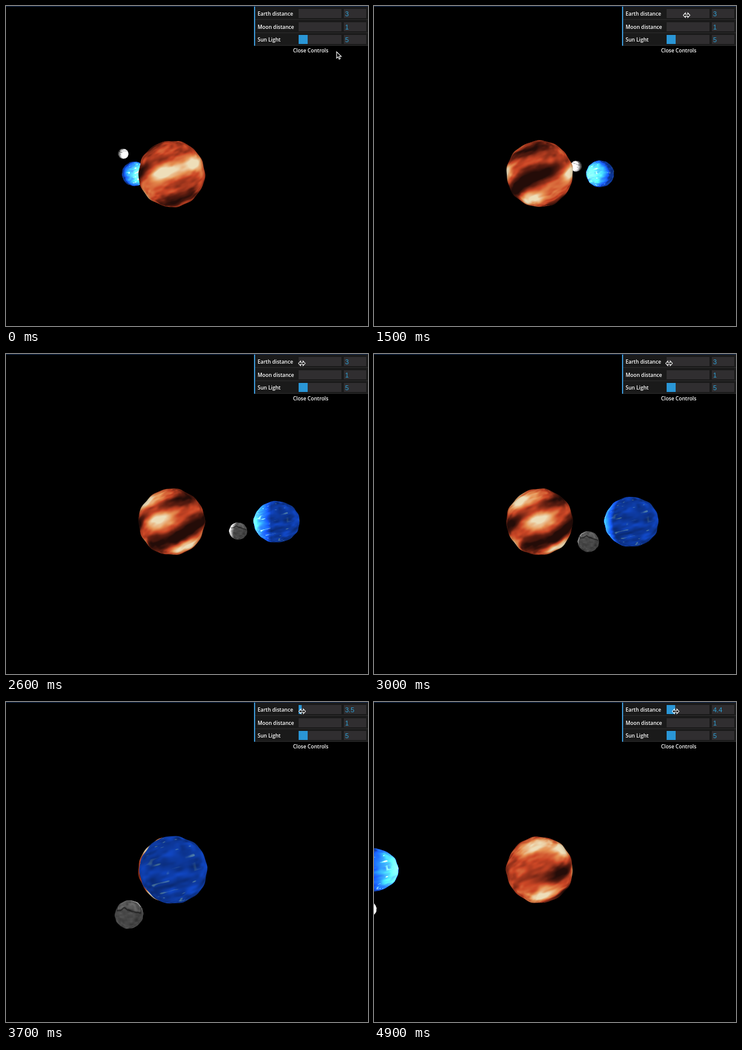
Animation of 600x531 px, one loop 5 s. Source, as an HTML page with a canvas:

```html
<!DOCTYPE html>
<html lang="en">
<head>
<meta charset="utf-8">
<title>Sun, Earth and Moon</title>
<style>
html, body { margin: 0; width: 100%; height: 100%; overflow: hidden; background: #000; }
canvas { display: block; width: 600px; height: 531px; }
</style>
</head>
<body>
<canvas id="stage" width="600" height="531"></canvas>
<script>
const W = 600, H = 531, LOOP = 5000, STEP = 100;
const CX = 274.5, CY = 278.5, FOCAL = 364, CAM = 7;
const ctx = document.getElementById('stage').getContext('2d');
const image = ctx.createImageData(W, H);
const px = image.data;

const clamp = (v, a = 0, b = 1) => Math.min(b, Math.max(a, v));
const mix = (a, b, k) => a + (b - a) * k;
const smooth = (a, b, v) => { const k = clamp((v - a) / (b - a)); return k * k * (3 - 2 * k); };

// Linear interpolation over rows of [position, value, ...]
function track(keys, t, col = 1) {
  let i = 1;
  while (i < keys.length - 1 && t > keys[i][0]) i++;
  const a = keys[i - 1], b = keys[i];
  return mix(a[col], b[col], clamp((t - a[0]) / (b[0] - a[0])));
}

function hash(x, y) {
  let h = Math.imul(x, 374761393) + Math.imul(y, 668265263) | 0;
  h = Math.imul(h ^ (h >>> 13), 1274126177);
  return ((h ^ (h >>> 16)) >>> 0) / 4294967296;
}

function noise(x, y) {
  const i = Math.floor(x), j = Math.floor(y);
  const u = smooth(0, 1, x - i), v = smooth(0, 1, y - j);
  return mix(mix(hash(i, j), hash(i + 1, j), u), mix(hash(i, j + 1), hash(i + 1, j + 1), u), v);
}

const fbm = (x, y) => 0.65 * noise(x, y) + 0.35 * noise(x * 2.1 + 7, y * 2.1 + 3);

// Slanted soft spots on a sphere, given as [longitude, latitude]
function glow(spots, lon, lat, width, height) {
  let sum = 0;
  for (const [a, b] of spots) {
    const dx = lon - a, u = dx * Math.cos(b) / width;
    const v = (lat - b + 0.28 * dx) * Math.cos(b) / height;
    sum += Math.exp(-u * u - v * v);
  }
  return sum;
}

const flares = [[-0.2, -0.04], [0.7, -0.3], [-1.65, 0.78], [-2.55, -0.05], [-3.2, -0.65], [-4.2, -0.78], [-4.05, 0.8]];
const shades = [[0.14, 0.84], [-1.37, 0], [-1.87, 0.36], [-1.57, -0.74], [-3.57, 0.09], [-2.83, 0.72]];
const heat = [[0, 36, 12, 8], [0.25, 95, 29, 16], [0.5, 203, 70, 37], [0.72, 230, 145, 82], [0.95, 238, 222, 185]];

function sunColor(lon, lat, facing) {
  const n = fbm(lon * 3 + 20, lat * 6 + lon * 2 + 9) - 0.5;
  const h = 0.48 + 0.36 * n + 0.55 * glow(flares, lon, lat, 0.43, 0.21) - 0.5 * glow(shades, lon, lat, 0.6, 0.19);
  const k = 0.82 + 0.18 * smooth(0, 0.5, facing);
  return [1, 2, 3].map(c => track(heat, h, c) * k);
}

function earthColor(lon, lat, facing, lit) {
  const n = fbm(lon * 2.5 + 40, lat * 5 + lon + 5);
  const cloud = 0.7 * smooth(0.8, 0.97, noise(lon * 4 + 11, lat * 10 + lon * 2.5));
  const k = (0.65 + 0.7 * n) * (1 + 4.3 * lit);
  return [mix(13, 95, cloud) * k + 70 * lit * lit, mix(56, 140, cloud) * k, mix(155, 160, cloud) * k];
}

function moonColor(lon, lat, facing, lit) {
  const n = fbm(lon * 2.5 + 60, lat * 4 + 31);
  const ridge = lat + 0.42 + 0.6 * (noise(lon * 3 + 5, 2) - 0.5);
  const crack = 1 - smooth(0, 0.1, Math.abs(ridge));
  const g = (42 + 50 * n + 22 * smooth(0, -0.2, ridge)) * (1 - 0.5 * crack) * (1 + 4.3 * lit);
  return [g, g, g];
}

function drawBody({ x, y, z, r, spin, color, seed }) {
  const cz = z - CAM, scale = -FOCAL / cz;
  const sx = CX + x * scale, sy = CY + y * scale, ext = r * scale * 1.5 + 4;
  const x1 = Math.min(W, Math.ceil(sx + ext)), y1 = Math.min(H, Math.ceil(sy + ext));
  for (let j = Math.max(0, Math.floor(sy - ext)); j < y1; j++) {
    for (let i = Math.max(0, Math.floor(sx - ext)); i < x1; i++) {
      // Point of the viewing ray closest to the centre
      const dx = (i + 0.5 - CX) / FOCAL, dy = (j + 0.5 - CY) / FOCAL;
      const len2 = dx * dx + dy * dy + 1;
      const near = (dx * x + dy * y - cz) / len2;
      const qx = near * dx - x, qy = near * dy - y, qz = -near - cz;
      const b = Math.hypot(qx, qy, qz);
      if (b > r * 1.06) continue;
      const a = Math.atan2(qy, qx);
      const lump = Math.sin(5 * a + seed + spin) + Math.sin(9 * a - 2 * spin) + Math.sin(14 * a + 3 * spin + seed);
      const rr = r * (1 + 0.007 * lump);
      const alpha = clamp((rr - b) * scale + 0.5);
      if (!alpha) continue;
      const half = Math.sqrt(Math.max(0, rr * rr - b * b)), back = half / Math.sqrt(len2);
      const nx = (qx - dx * back) / rr, ny = (qy - dy * back) / rr, nz = (qz + back) / rr;
      // The light sits in the middle of the sun
      const lx = -x - nx * r, ly = -y - ny * r, lz = -z - nz * r;
      const lit = Math.max(0, (nx * lx + ny * ly + nz * lz) / (Math.hypot(lx, ly, lz) || 1));
      const rgb = color(Math.atan2(nx, nz) - spin, Math.asin(clamp(ny, -1, 1)), half / rr, lit);
      const o = (j * W + i) * 4;
      for (let c = 0; c < 3; c++) px[o + c] = mix(px[o + c], rgb[c], alpha);
    }
  }
}

function drawScene(t, dist) {
  for (let i = 0; i < px.length; i += 4) {
    px[i] = px[i + 1] = px[i + 2] = 0;
    px[i + 3] = 255;
  }
  const orbit = 3.708 - t, swing = 0.5 * (t - 2.12);
  const x = dist * Math.sin(orbit), z = dist * Math.cos(orbit);
  const bodies = [
    { x: 0, y: 0, z: 0, r: 1.046, spin: 0.85 * t, color: sunColor, seed: 1 },
    { x, y: 0, z, r: 0.532, spin: 0.5 * t, color: earthColor, seed: 3 },
    { x: x - Math.cos(swing), y: Math.sin(swing), z, r: 0.221, spin: 0.3 * t, color: moonColor, seed: 5 }
  ];
  bodies.sort((a, b) => a.z - b.z).forEach(drawBody);
  ctx.putImageData(image, 0, 0);
}

function rect(color, x, y, w, h) {
  ctx.fillStyle = color;
  ctx.fillRect(x, y, w, h);
}

function text(str, x, y, font, color, align = 'left') {
  ctx.font = font;
  ctx.fillStyle = color;
  ctx.textAlign = align;
  ctx.fillText(str, x, y);
}

const LABEL = '600 8.5px "Open Sans", "Noto Sans", sans-serif';
const NUMBER = '11px "Liberation Sans", Arial, sans-serif';
const SLIDER = 485, SLIDER_W = 71;

function drawPanel(dist) {
  rect('#10284f', 0, 0, W, 1);
  rect('#1a1a1a', 411, 1, 189, 65);
  const rows = [['Earth distance', dist, (dist - 3) / 7], ['Moon distance', 1, 0], ['Sun Light', 5, 0.211]];
  rows.forEach(([name, value, fill], i) => {
    const y = Math.round(5 + i * 21.5);
    rect('#2c2c2c', 411, y + 17, 189, 1);
    rect('#302e30', SLIDER, y, SLIDER_W, 15);
    rect('#302e30', 560, y, 37, 15);
    rect('#2a96d6', SLIDER, y, SLIDER_W * fill, 15);
    text(name, 417, y + 11, LABEL, '#fff');
    text(String(value), 562, y + 12, NUMBER, '#2fa1d6');
  });
  rect('#3a94d2', 411, 1, 2, 65);
  text('Close Controls', 505, 77, LABEL, '#fff', 'center');
}

const arrow = new Path2D('M0 0V10.6L2.5 8.4L4.2 12.2L6 11.4L4.4 7.7H7.7Z');
const resize = new Path2D('M-5.5 0L-2 -3.8V-1.3H2V-3.8L5.5 0L2 3.8V1.3H-2V3.8Z');
const DRAG = 3.7;
const path = [[0, 548, 76], [0.6, 507, 18], [0.8, 499, 17], [1, 560, 15], [1.8, 493, 15.5], [3, 489, 15.5]];

// The earth slider is dragged one unit per second
const distance = t => t < DRAG ? 3 : Math.min(4.4, Math.round((t - 0.2) * 10) / 10);

function drawMouse(t, dist) {
  const handle = SLIDER + 0.8 + SLIDER_W * (dist - 3) / 7;
  ctx.save();
  ctx.translate(t < DRAG ? track(path, t, 1) : handle, track(path, t, 2));
  const shape = t < 1.25 ? arrow : resize;
  ctx.fillStyle = '#000';
  ctx.strokeStyle = '#fff';
  ctx.lineWidth = 1.1;
  ctx.fill(shape);
  ctx.stroke(shape);
  ctx.restore();
}

const start = performance.now();
let shown = -1;

function tick() {
  const step = Math.floor(((performance.now() - start) % LOOP) / STEP);
  if (step !== shown) {
    shown = step;
    const t = step * STEP / 1000, dist = distance(t);
    drawScene(t, dist);
    drawPanel(dist);
    drawMouse(t, dist);
  }
  requestAnimationFrame(tick);
}
tick();
</script>
</body>
</html>
```
